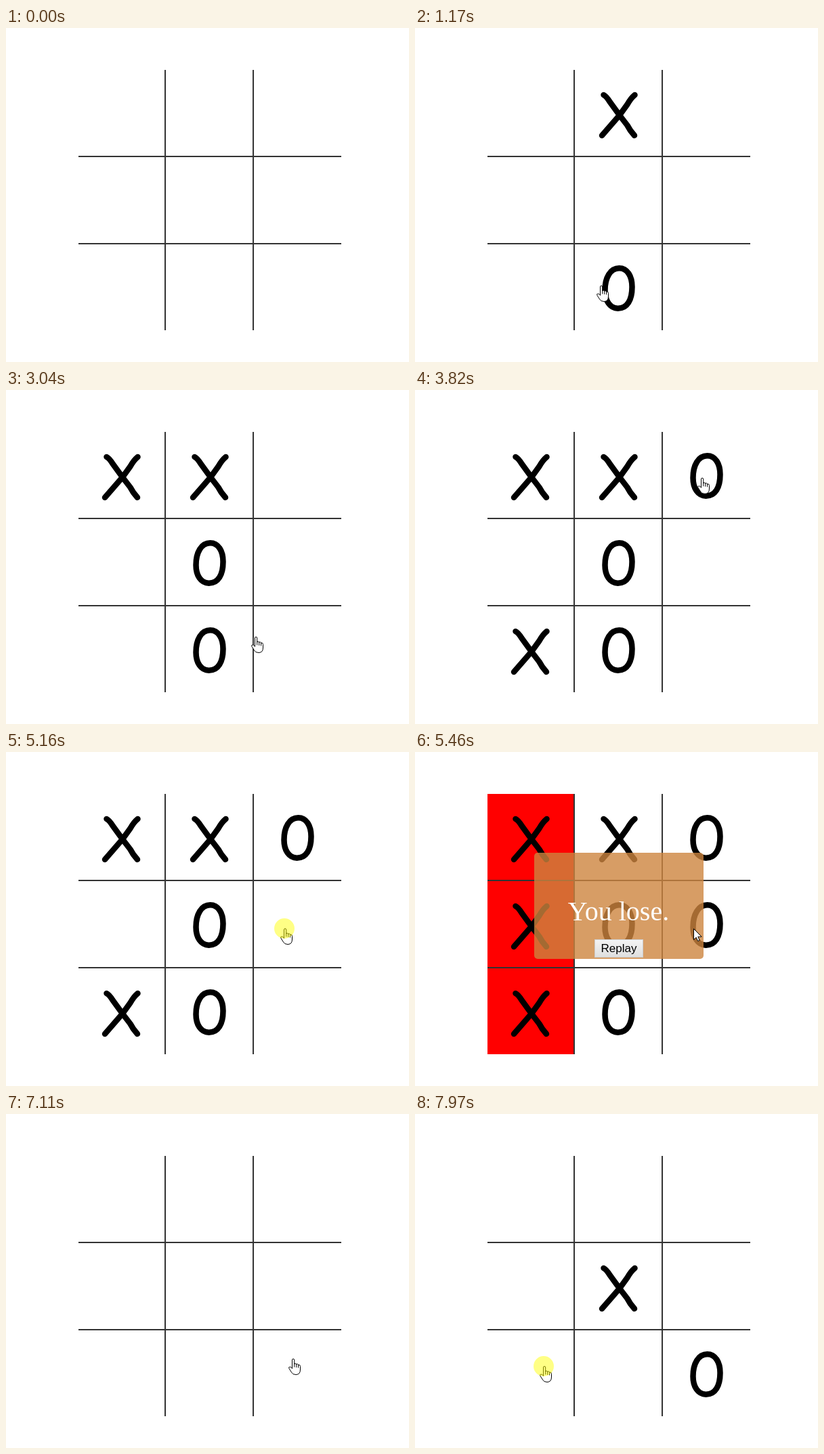
Recreate the animation shown at these times as an HTML page with a canvas. Size 595 by 494 pixels, loop 8000 ms.

```html
<!DOCTYPE html>
<html lang="en">
<head>
<meta charset="utf-8">
<title>Noughts and crosses</title>
<style>
html, body { margin: 0; width: 100%; height: 100%; overflow: hidden; background: #fff; }
canvas { display: block; }
</style>
</head>
<body>
<canvas id="stage" width="595" height="494"></canvas>
<script>
const ctx = document.getElementById('stage').getContext('2d');
const LOOP = 8000, TICK = 80, PRESS = 160, REST = 360;

const shapes = {
  X: new Path2D('M-22-28Q-18-26-13-18L1.5 2L13 17Q17 25 23.5 32M24-28Q18-23 13-14L1.5 2L-24.5 32'),
  O: new Path2D('M1-29.7C13-29.7 20-18 20-2C20 17 13 29.7-1 29.7C-13 29.7-20 18-20 3C-20-16-12-29.7 1-29.7Z'),
  hand: new Path2D('M-.5 14V2A1.5 1.7 0 0 1 2.7 2V7.5Q4.2 6.2 5.7 8Q7.3 7 8.6 9Q11.5 8.3 11.5 11.5V16Q11.5 23.5 5 23.5Q0 23.5-1.5 20L-5 14.5Q-6 12.5-4.5 12Q-2.5 11.5-.5 14ZM2.7 7V12M5.7 8V12.5M8.6 9V13'),
  arrow: new Path2D('M.5.8V16.6L4.2 13.2L6.6 18.6L9.2 17.5L6.8 12.2H11.8Z')
};

// Each turn: the pointer leaves at "go", passes "via", clicks "at" and lets go at "end".
// The answering X goes into cell "reply", counted row by row.
const turns = [
  { go: 230, via: [214, 366], at: [298, 377], end: 1100, reply: 1 },
  { go: 1100, via: [213, 363], at: [318, 250], end: 2580, reply: 0 },
  { go: 2900, via: [395, 373], at: [423, 130], end: 3820, reply: 6 },
  { go: 3960, via: [240, 328], at: [411, 261], end: 5300, reply: 3 },
  { go: 5700, via: [443, 354], at: [297, 291], end: 6570 },
  { go: 6790, at: [423, 362], end: 7330, reply: 4 },
  { go: 7330, at: [190, 373], end: 8130 }
];

const inside = ([px, py], x, y, w, h) => px >= x && px < x + w && py >= y && py < y + h;
const cellAt = ([x, y]) => Math.floor((x - 106) / 129) + 3 * Math.floor((y - 61) / 129);
const winningColumn = board => [0, 1, 2].findIndex(c => [c, c + 3, c + 6].every(i => board[i] === 'X'));

// A click plays a cell, or clears the board once the game is over.
function boardAt(t) {
  let board = [];
  for (const { at, end, reply } of turns) {
    if (t < end) break;
    if (winningColumn(board) >= 0) {
      board = [];
    } else {
      board[cellAt(at)] = 'O';
      board[reply] = 'X';
    }
  }
  return board;
}

function pointerAt(t) {
  let from = [427, 500];
  for (const { go, via, at, end } of turns) {
    if (t < go) break;
    const steps = Math.floor((t - go) / TICK) + 1;
    const p = Math.min(1, steps * TICK / (end - REST - go)), q = 1 - p;
    from = from.map((a, i) => {
      const mid = (a + at[i]) / 2;
      const ctrl = via ? 2 * via[i] - mid : mid;
      return Math.round(q * q * a + 2 * p * q * ctrl + p * p * at[i]);
    });
  }
  return from;
}

function rect(color, x, y, w, h) {
  ctx.fillStyle = color;
  ctx.fillRect(x, y, w, h);
}

function text(str, font, color, x, y) {
  ctx.font = font;
  ctx.fillStyle = color;
  ctx.fillText(str, x, y);
}

function drawBoard(board, won) {
  rect('#fff', 0, 0, 595, 494);
  if (won >= 0) rect('#f00', 107 + 129 * won, 62, 128, 385);
  for (const x of [234, 364]) rect('#333', x, 62, 2, 385);
  for (const y of [189, 318]) rect('#333', 107, y, 388, 2);

  ctx.strokeStyle = '#000';
  ctx.lineCap = ctx.lineJoin = 'round';
  ctx.lineWidth = 8.5;
  board.forEach((mark, i) => {
    ctx.save();
    ctx.translate(170.5 + 130 * (i % 3), 127 + 129 * Math.floor(i / 3));
    ctx.stroke(shapes[mark]);
    ctx.restore();
  });
}

function drawDialog(pressed) {
  ctx.fillStyle = 'rgba(205,133,63,.8)';
  ctx.beginPath();
  ctx.roundRect(176, 149, 250, 157, 5);
  ctx.fill();
  ctx.textAlign = 'center';
  text('You lose.', '40px "Liberation Serif", serif', '#fff', 300.5, 249);

  const shade = ctx.createLinearGradient(0, 277, 0, 304);
  shade.addColorStop(0, pressed ? '#dcdcdc' : '#f4f4f4');
  shade.addColorStop(1, pressed ? '#f4f4f4' : '#dedede');
  rect('#ccc', 265, 277, 72, 27);
  rect(shade, 266, 278, 70, 25);
  text('Replay', '17px "Liberation Sans", sans-serif', '#000', 301, 296);
}

function drawPointer(pos, shape, pressed) {
  ctx.save();
  ctx.translate(...pos);
  ctx.lineWidth = 1;
  ctx.strokeStyle = '#000';
  ctx.fillStyle = '#fff';
  ctx.fill(shape);
  ctx.stroke(shape);
  if (pressed) {
    ctx.fillStyle = 'rgba(255,255,0,.48)';
    ctx.beginPath();
    ctx.arc(0, 0, 15, 0, 2 * Math.PI);
    ctx.fill();
  }
  ctx.restore();
}

function draw(now) {
  const t = now % LOOP;
  const board = boardAt(t), won = winningColumn(board);
  const pressed = turns.some(({ end }) => t >= end - PRESS && t < end);
  const pos = pointerAt(t);
  const onDialog = won >= 0 && inside(pos, 176, 149, 250, 157);
  const onCell = inside(pos, 107, 62, 388, 385);
  drawBoard(board, won);
  if (won >= 0) drawDialog(pressed);
  drawPointer(pos, onCell && !onDialog ? shapes.hand : shapes.arrow, pressed);
}

let origin;
function tick(now) {
  origin ??= now;
  draw(now - origin);
  requestAnimationFrame(tick);
}
draw(0);
requestAnimationFrame(tick);
</script>
</body>
</html>
```
